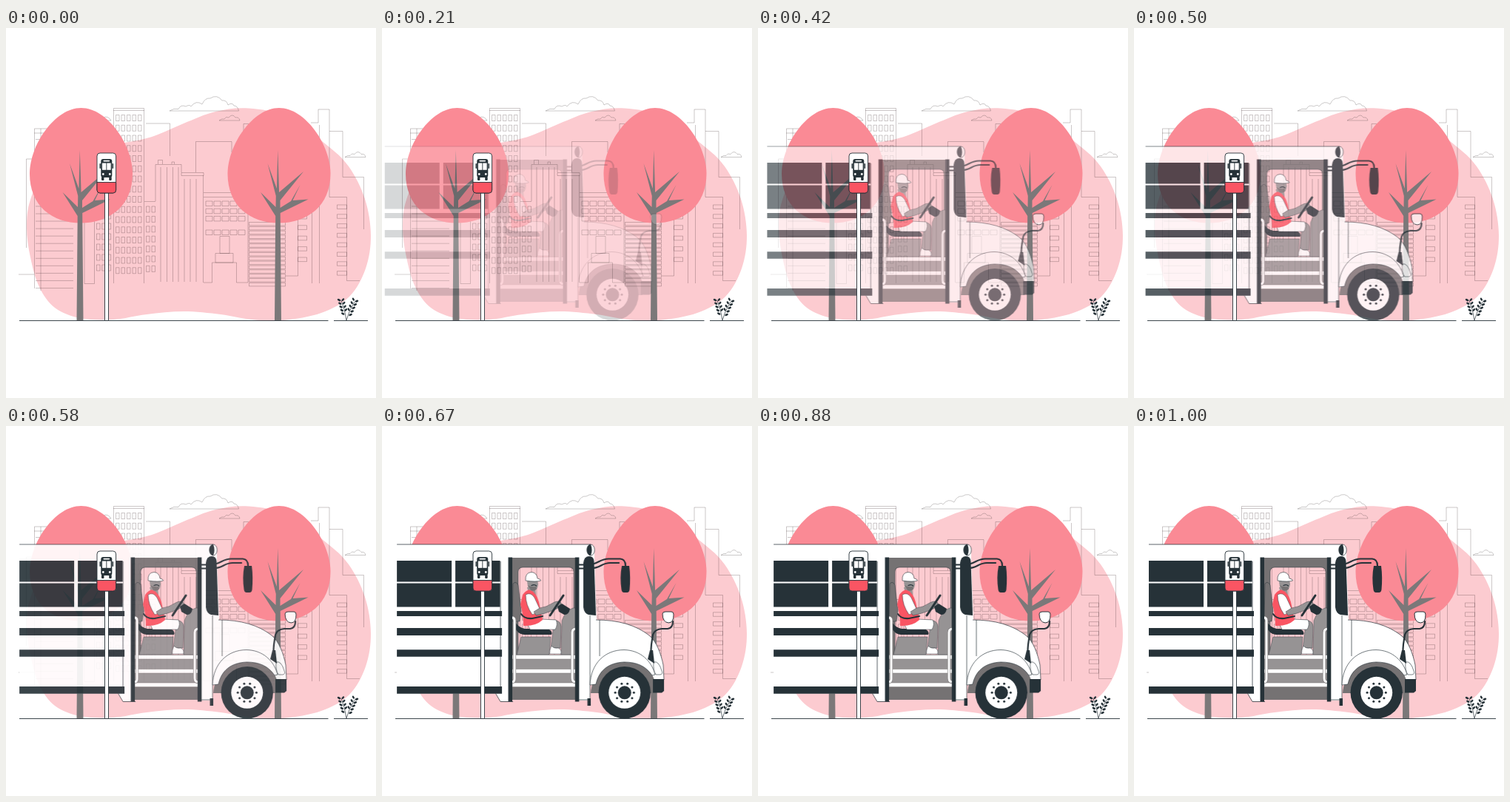
Animation, 500 px wide and 500 px high, one loop 1.04 s. Source, as an HTML page with a canvas:

```html
<!DOCTYPE html>
<html lang="en">
<head>
<meta charset="utf-8">
<title>Bus stop</title>
<style>
html, body { margin: 0; width: 100%; height: 100%; overflow: hidden; background: #fff; }
canvas { display: block; width: 500px; height: 500px; }
</style>
</head>
<body>
<canvas id="stage" width="500" height="500"></canvas>
<script>
const SIZE = 500, LOOP = 1040, ENTER = 1000, LEAD = 16, SHIFT = 20;
const INK = '#263238', RED = '#fa5563', ROSE = '#fa8a95', BLUSH = '#fccbd0';
const BARK = '#7b7879', GREY = '#969394', DARK = '#757273', LINE = 'rgba(60,40,45,.4)';

const stage = document.getElementById('stage').getContext('2d');
let g;

function layer(draw) {
  const c = document.createElement('canvas');
  c.width = c.height = SIZE;
  g = c.getContext('2d');
  g.lineJoin = 'round';
  draw();
  return c;
}

function shape(d, fill, stroke, width = 0.7) {
  const p = typeof d === 'string' ? new Path2D(d) : d;
  if (fill) { g.fillStyle = fill; g.fill(p, 'evenodd'); }
  if (stroke) { g.strokeStyle = stroke; g.lineWidth = width; g.stroke(p); }
}

const line = (d, color = LINE, width = 0.65) => shape(d, null, color, width);

function box(x, y, w, h, fill, stroke, r = 0, width) {
  const p = new Path2D();
  p.roundRect(x, y, w, h, r);
  shape(p, fill, stroke, width);
}

function disc(x, y, rx, fill, ry = rx, turn = 0, stroke) {
  const p = new Path2D();
  p.ellipse(x, y, rx, ry, turn, 0, Math.PI * 2);
  shape(p, fill, stroke);
}

function tube(d, color, width) {
  g.lineCap = 'round';
  line(d, color, width);
  g.lineCap = 'butt';
}

// Closed smooth curve through x,y pairs
function blob(v, fill) {
  const n = v.length / 2, p = new Path2D();
  const at = i => { const k = (i + n) % n; return [v[2 * k], v[2 * k + 1]]; };
  p.moveTo(v[0], v[1]);
  for (let i = 0; i < n; i++) {
    const [a, b, c, d] = [at(i - 1), at(i), at(i + 1), at(i + 2)];
    p.bezierCurveTo(b[0] + (c[0] - a[0]) / 6, b[1] + (c[1] - a[1]) / 6,
      c[0] - (d[0] - b[0]) / 6, c[1] - (d[1] - b[1]) / 6, c[0], c[1]);
  }
  shape(p, fill);
}

function windows(x, y, cols, rows, dx, dy, w, h) {
  for (let r = 0; r < rows; r++)
    for (let c = 0; c < cols; c++) box(x + c * dx, y + r * dy, w, h, null, LINE, 0, 0.65);
}

function skyline() {
  line('M27.5 297V177H38M38.5 352V136H62M47 136V355M38 142H60M17 333H38');
  for (let i = 0; i < 21; i++) line(`M40 ${150.5 + i * 10.05}H91`);
  line('M106 255V345.5H119.5V225');
  windows(122.5, 236, 3, 7, 7.3, 14, 4.5, 8);
  line('M145.5 345V108.5H186.5V345M145 111.5H187');
  windows(148.5, 117.5, 5, 16, 7.5, 13.75, 4.5, 8);
  line('M189 129H221.5V173');
  line('M187 234.5H202');
  windows(189.5, 241, 2, 7, 7.5, 13.4, 4.5, 8);
  line('M202 234V184.5H237V195M205.5 184V178.5H211.5V184M224 184V181H227.5V184');
  line('M209 188V343M217.5 188V343M225.5 188V343M233 188V343');
  box(237, 195.5, 30, 4, null, LINE, 0, 0.65);
  line('M241 204V343M249 204V343M257 204V343M266.5 199V344');
  line('M256.5 195V153.5H305V168M321 142V129.5H328');
  line('M267 222.5H327M267 228.5H327M267 344H278.5V317H311.5V344H327V228');
  windows(270, 234, 5, 3, 11, 10.2, 9, 6.5);
  windows(270, 273, 5, 1, 11, 10, 9, 6.5);
  box(289, 281.5, 13, 23, null, LINE, 0, 0.65);
  box(283, 304.5, 24, 12.5, null, LINE, 0, 0.65);
  windows(328.5, 262.5, 1, 15, 1, 5.85, 49, 4.5);
  line('M378 335H394.5V240');
  windows(394.5, 238, 1, 6, 1, 14.4, 12, 5.6);
  line('M412 128H422V110H437V228.5H460.5V341.5H478M413.5 235V345M423.5 131V345');
  line('M437 139.5H455V201.5H483.5V272');
  windows(447.5, 239, 1, 8, 1, 12.8, 13, 5.5);
}

function clouds() {
  const c = 'rgba(60,50,52,.38)';
  shape('M221 112Q227 108 233 109.5Q236 103 243 106Q248 103 250 106Q257 97 265 103Q269 94 276 95Q285 89 292 98Q298 97 300 104Q306 100 308 105Q313 105 314.5 112Z', null, c);
  const small = 'q4-3 7-2q2-4 6-2q5-6 9 0q5-1 6 4Z';
  shape('M288 125' + small, null, c);
  shape('M458 174.5' + small, null, c);
  shape('M131 121Q138 118 142 125H130', null, c);
}

function tree(dx) {
  g.save();
  g.translate(dx, 0);
  shape('M101.5 108C137 108 171 158 171 197C171 240 140 263.5 101 263.5C62 263.5 32 240 32 197C32 158 66 108 101.5 108Z', ROSE);
  shape('M95.5 395.5L96.7 254L76.5 222L97 242L97.3 227L86 183L98.4 217L99.8 165L101.6 222L134.5 194L103 233V243L117.5 234L130 212L120 233L141 231.5L103.2 250L104.5 395.5Z', BARK);
  g.restore();
}

function plant() {
  tube('M460 395Q458 380 453 368M460 395Q463 383 471 370', INK, 0.7);
  for (let i = 0; i < 5; i++) {
    const y = 387 - i * 4.6, l = 458.2 - i * 1.3, r = 462.6 + i * 2.1;
    disc(l - 3, y - 1, 2.4, INK, 1.4, 0.5);
    disc(r + 3, y + 0.5, 2.4, INK, 1.4, -0.4);
    if (i) {
      disc(l + 2.4, y - 1.5, 2.2, INK, 1.3, -0.8);
      disc(r - 1.6, y - 2, 2.2, INK, 1.3, 1);
    }
  }
}

function scenery() {
  blob([328, 108.5, 380, 120, 432, 157, 463, 187, 485, 231, 493, 280, 486, 325, 464, 363,
    426, 385, 375, 395, 332, 394, 290, 387, 240, 383, 190, 387, 145, 394, 100, 392, 66, 378,
    45, 350, 33, 310, 28, 270, 33, 232, 55, 190, 105, 163, 166, 154, 200, 146, 240, 129, 283, 113], BLUSH);
  skyline();
  clouds();
  tree(0);
  tree(267.5);
}

function driver() {
  // seat
  shape('M177 213Q181 209 184 215L188 250L186 264H176Z', DARK, INK, 0.5);
  shape('M188 285H228L226 309H182Z', GREY, INK, 0.4);
  shape('M180 265Q184 272 193 274H224Q231 277 229 282H192Q181 281 178 267Z', INK);
  // legs
  shape('M226 262Q242 261 242 271L241 300H228L231 276Z', GREY, INK, 0.4);
  shape('M196 266L214 261L235 262Q238 268 234 275H200Z', '#fff', INK, 0.5);
  shape('M229 297Q232 301 238 300Q243 302 242 308H226.5Q226 303 229 297Z', '#fff', INK, 0.5);
  // body
  shape('M196 218H207L208 229L199 230Z', GREY);
  shape('M190 228Q194 222 200 221Q209 226 212 238L217 262Q207 271 191 270Q191 255 187 241Z', RED);
  shape('M194 228Q201 224 206 232L213 247Q208 254 203 255Q194 242 194 228Z', '#fff', INK, 0.5);
  shape('M205 251L213 246Q222 245 231 239Q238 235 242 239Q242 244 236 247Q220 254 208 256Z', GREY, INK, 0.45);
  tube('M188 254Q192 261 203 260L217 257', INK, 2);
  // head
  shape('M195.5 207H210L211 214Q210 222 205 223Q198 223 197 217Z', GREY);
  shape('M197 215Q201 218 208 217L209 220Q206 224 201 222Z', DARK);
  tube('M202 215.5Q206 213.5 208.5 216', INK, 1.3);
  shape('M194 209Q193 198 202 197.5Q209 198 210 206Q214 206.5 214.5 209Q208 211 194 209Z', '#fff', INK, 0.6);
  // dashboard and steering wheel
  shape('M258 246Q248 249 243 263L242 309H261V246Z', GREY, INK, 0.4);
  shape('M237 244L243 240L254 247Q252 256 246 255L239 251Z', INK);
  tube('M227 256L245 229', INK, 3);
}

function door() {
  const frame = new Path2D('M175 178H262V310H175Z');
  frame.roundRect(184, 191, 75, 119, [6, 6, 0, 0]);
  shape(frame, DARK);
  box(175, 309, 87, 45, GREY);
  line('M184 309V197Q184 191 190 191H253Q259 191 259 197V250', INK, 0.5);
  driver();
  for (const y of [309.5, 328.5, 347]) box(176, y, 86, 5.5, '#fff', DARK, 0, 0.5);
  box(176, 353, 86, 17, DARK);
  for (const d of ['M176 259Q179 259 179 263V342Q179 346 175 346', 'M262 274Q257 274 257 279V341Q257 346 262 346']) {
    tube(d, DARK, 4.2);
    tube(d, '#fff', 3);
  }
  box(170.5, 177.5, 5.5, 195, INK);
  box(260.8, 177.5, 5.5, 195, INK);
}

function side() {
  shape('M20 160H280Q286 160 287 168V180L290 262H281V371H262V178H172V372H160L153.5 361.5H20Z', '#fff');
  line('M20 160H282M153.5 361.5L160 372.5H177M160 183V352', INK, 0.75);
  box(20, 182, 74, 62.5, INK);
  box(99, 182, 60.5, 62.5, INK);
  box(20, 210.6, 140, 2, '#fff');
  for (const [y, h] of [[250, 7], [273, 10], [302.3, 9.4], [352, 9.7]]) box(20, y, 142, h, INK);
}

function front() {
  shape('M281 262L289 262C319 262 343 269 361 283C371 291 377 308 380 323L381 344H368L362 350H281Z', '#fff');
  line('M289 262C319 262 343 269 361 283C371 291 377 308 380 323L381 343M294 262V311M281 256V370H266', INK, 0.7);
  shape('M282 361C283 338 302 319 328 319C350 319 365 330 368 344V361Z', DARK);
  shape('M281 350C282 321 301 302.5 327 302.5C349 303 364 317 369 336L365 337C356 324 344 319 327 319C305 320 293 331 289 349Z', '#fff', INK, 0.65);
  shape('M366 342H381V358L378 360.5H366Z', INK);
  shape('M367 319Q374 317 378 331Q380 335 376 336H370Q366 330 367 319Z', '#fff', INK, 0.6);
  box(277.5, 368, 4.5, 10, INK);
  // windscreen and roof lamp
  shape('M272 185Q273 176 280 176Q286 176 286.5 183L289 256L279 255Q273 253 272 245Z', INK);
  disc(282, 167.5, 5.2, '#fff', 7.5, 0, INK);
  shape('M282 160C275 160 275 175 282 175Q285 168 282 160Z', INK);
  // mirrors
  tube('M266 187.5H279C292 187 294 179.5 306 179.5H322Q329 180 329 189', INK, 2.2);
  tube('M266 192.5H282C295 192 297 185 308 185H320', INK, 2.2);
  shape('M324 189H334Q336 204 334.5 221Q334 225 331 225H327Q324 225 323.5 221Q321 204 324 189Z', INK);
  tube('M364 313C362 299 365 290 366 282Q368 275 378 274H386Q393 273 393 264', INK, 2.2);
  shape('M379 254Q379 251 383 251H391Q394 251 394 255Q394 266 387 266Q379 265 379 254Z', '#fff', INK, 1);
  shape('M362 303H366L368 321L359 315Z', INK);
  // wheel
  const x = 327.7, y = 360.3;
  disc(x, y, 35.2, INK);
  disc(x, y, 21.5, '#fff');
  disc(x, y, 9, INK);
  for (let i = 0; i < 10; i++) {
    const a = i * Math.PI / 5;
    disc(x + 12.6 * Math.cos(a), y + 12.6 * Math.sin(a), 1.5, INK);
  }
}

function bus() {
  side();
  door();
  front();
}

function sign() {
  box(133.5, 222, 5, 173.5, '#fff', INK, 0, 0.9);
  box(123, 169, 25.6, 54, '#fff', INK, 4, 0.9);
  box(123, 208.5, 25.6, 14.5, RED, INK, [0, 0, 4, 4], 0.9);
  box(128.3, 177, 15, 25, INK, null, 3);
  box(126.5, 183, 1.6, 7, INK, null, 1);
  box(143.5, 183, 1.6, 7, INK, null, 1);
  box(129, 201, 3.5, 5, INK, null, 1);
  box(139.2, 201, 3.5, 5, INK, null, 1);
  box(131.5, 178.7, 8.6, 1.8, '#fff', null, 0.9);
  box(130, 182.5, 5.4, 9.3, '#fff');
  box(136.3, 182.5, 5.4, 9.3, '#fff');
  disc(131.3, 197.5, 1.4, '#fff');
  disc(140.3, 197.5, 1.4, '#fff');
}

function foreground() {
  line('M18 395.5H435.5M443 395.5H489', INK, 0.9);
  plant();
  sign();
}

const mix = (a, b, s) => 3 * (1 - s) * (1 - s) * s * a + 3 * (1 - s) * s * s * b + s * s * s;

// cubic-bezier(.36, -.01, .5, 1.38)
function ease(x) {
  if (x >= 1) return 1;
  let lo = 0, hi = 1;
  for (let i = 0; i < 24; i++) {
    const m = (lo + hi) / 2;
    if (mix(0.36, 0.5, m) < x) lo = m; else hi = m;
  }
  return mix(-0.01, 1.38, lo);
}

const back = layer(scenery), ride = layer(bus), near = layer(foreground);

function frame(now) {
  const k = ease((now % LOOP + LEAD) / ENTER);
  stage.fillStyle = '#fff';
  stage.fillRect(0, 0, SIZE, SIZE);
  stage.drawImage(back, 0, 0);
  stage.globalAlpha = Math.max(0, Math.min(1, k));
  stage.drawImage(ride, SHIFT * (k - 1), 0);
  stage.globalAlpha = 1;
  stage.drawImage(near, 0, 0);
  requestAnimationFrame(frame);
}
requestAnimationFrame(frame);
</script>
</body>
</html>
```
